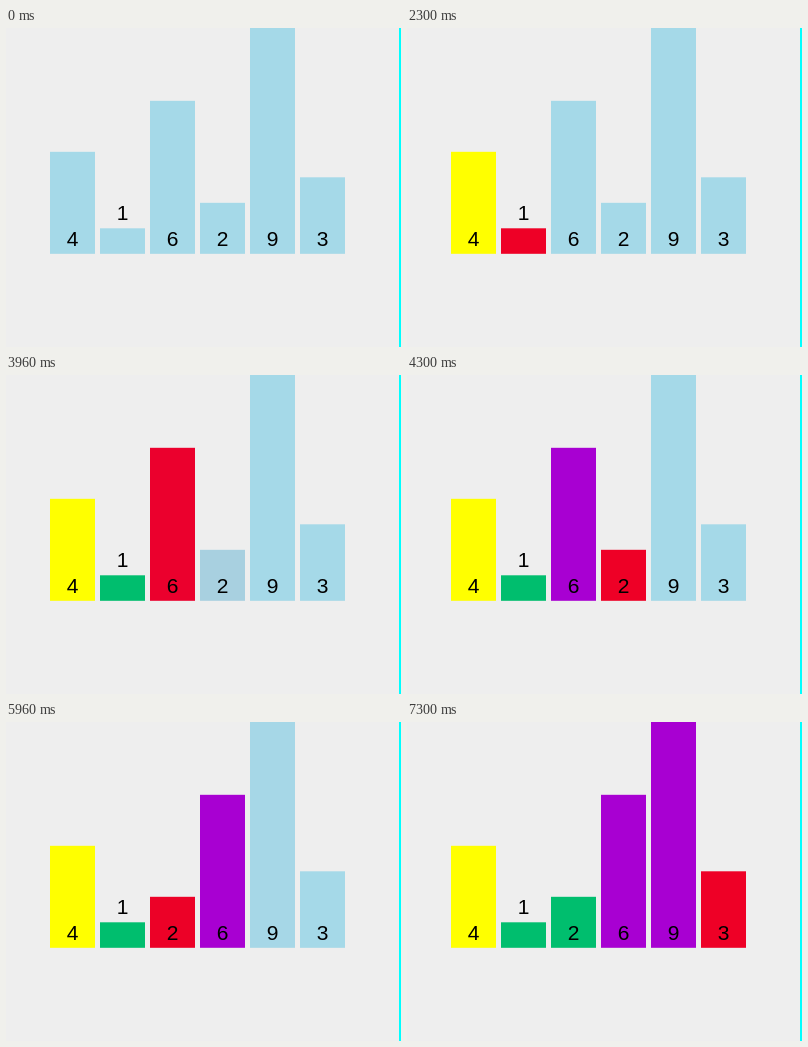
Write an HTML page with a canvas that moves like this. It is 395 px wide and 319 px high and loops after 8000 ms.

```html
<!DOCTYPE html>
<html lang="en">
<head>
<meta charset="utf-8">
<title>Partition step</title>
<style>
  html, body { margin: 0; width: 100%; height: 100%; overflow: hidden; background: #eee; }
  canvas { display: block; }
</style>
</head>
<body>
<canvas id="stage" width="395" height="319"></canvas>
<script>
const ctx = document.getElementById('stage').getContext('2d');
const LOOP = 8000, FADE = 330;
const BASE = 225.8, UNIT = 25.5, LEFT = 44, PITCH = 50, WIDTH = 45;
const BLUE = [165, 217, 232], YELLOW = [255, 255, 0], RED = [238, 0, 38],
      GREEN = [0, 190, 110], PURPLE = [168, 0, 210];

// Each change is [start time, new value].
const bars = [
  { value: 4, colors: [[460, YELLOW]] },
  { value: 1, colors: [[1295, RED], [2860, GREEN]] },
  { value: 6, colors: [[2860, RED], [3940, PURPLE]], slots: [[4945, 3]] },
  { value: 2, colors: [[3940, RED], [5955, GREEN]], slots: [[4945, 2]] },
  { value: 9, colors: [[5955, RED], [6990, PURPLE]] },
  { value: 3, colors: [[6990, RED]] }
];

const bezier = (a, b, u) =>
  3 * a * u * (1 - u) ** 2 + 3 * b * u * u * (1 - u) + u ** 3;

// The standard CSS "ease" curve, solved by bisection.
function ease(p) {
  if (p <= 0) return 0;
  if (p >= 1) return 1;
  let low = 0, high = 1;
  for (let i = 0; i < 20; i++) {
    const mid = (low + high) / 2;
    if (bezier(0.25, 0.25, mid) < p) low = mid; else high = mid;
  }
  return bezier(0.1, 1, low);
}

const mix = (a, b, k) => a + (b - a) * k;

function colorAt(bar, time) {
  return (bar.colors || []).reduce((color, [start, next]) => {
    const k = ease((time - start) / FADE);
    return color.map((c, i) => mix(c, next[i], k));
  }, BLUE);
}

function slotAt(bar, index, time) {
  return (bar.slots || []).reduce((slot, [start, next]) =>
    mix(slot, next, ease((time - start) / FADE)), index);
}

function drawBar(bar, index, time) {
  const x = LEFT + PITCH * slotAt(bar, index, time);
  const height = bar.value * UNIT;
  ctx.fillStyle = `rgb(${colorAt(bar, time).map(Math.round).join(',')})`;
  ctx.fillRect(x, BASE - height, WIDTH, height);
  ctx.fillStyle = '#000';
  ctx.fillText(bar.value, x + WIDTH / 2, bar.value === 1 ? 192 : 218);
}

function draw(now) {
  const time = now % LOOP;
  ctx.fillStyle = '#eee';
  ctx.fillRect(0, 0, 395, 319);
  ctx.font = '21px "Liberation Sans", Helvetica, Arial, sans-serif';
  ctx.textAlign = 'center';
  bars.forEach((bar, index) => drawBar(bar, index, time));
  ctx.fillStyle = '#0ff';
  ctx.fillRect(393, 0, 2, 319);
}

let origin = null;
function tick(now) {
  if (origin === null) origin = now;
  draw(now - origin);
  requestAnimationFrame(tick);
}
draw(0);
requestAnimationFrame(tick);
</script>
</body>
</html>
```
